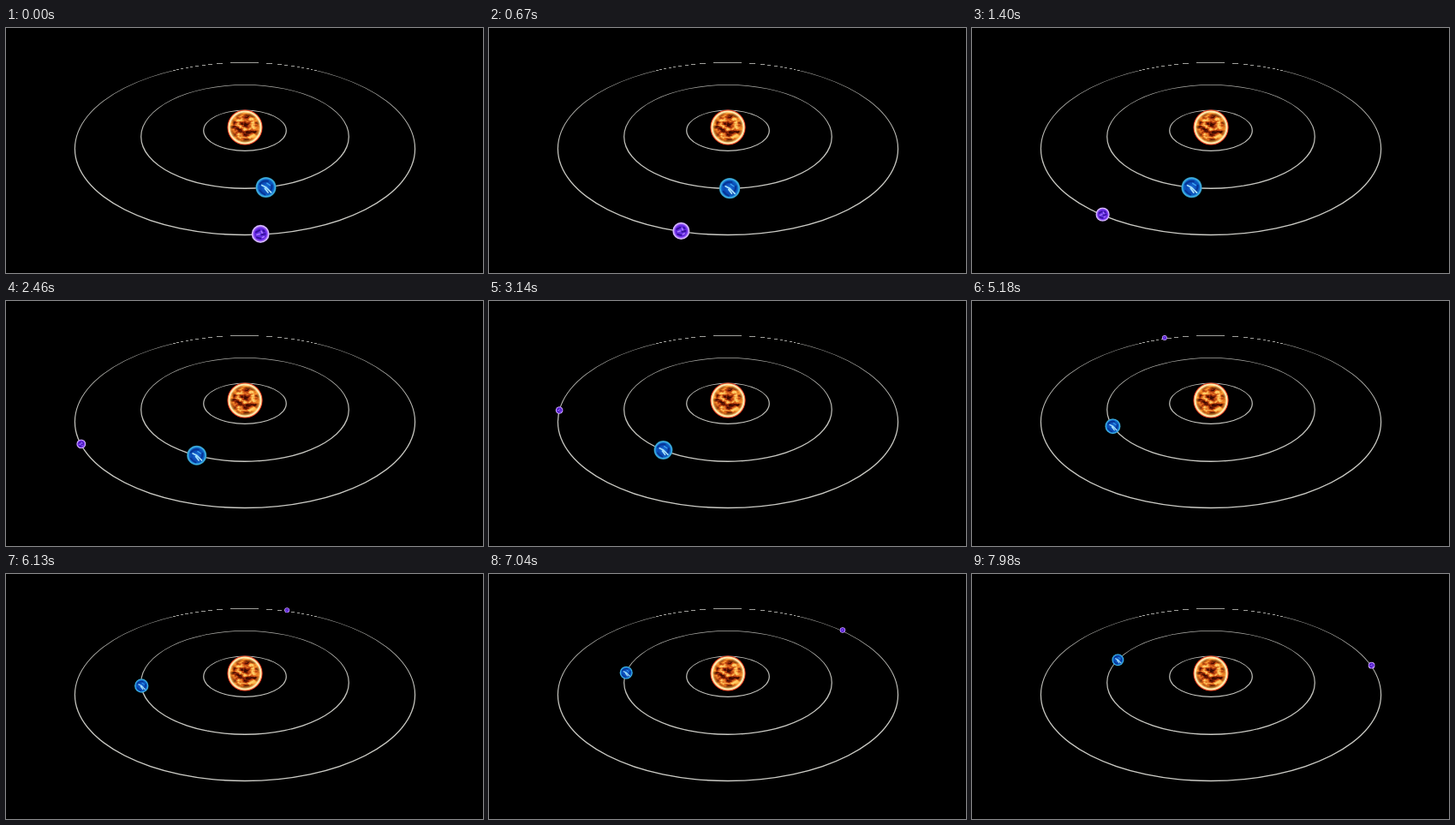
An HTML page that plays this animation: 557 by 286 pixels, repeating every 8 s.

```html
<!DOCTYPE html>
<html lang="en">
<head>
<meta charset="utf-8">
<title>Orbits</title>
<style>
  html, body { margin: 0; width: 100%; height: 100%; overflow: hidden; background: #000; }
  svg { display: block; width: 557px; height: 286px; }
  .orbit { fill: url(#fade); fill-rule: evenodd; }
</style>
</head>
<body>
<svg viewBox="0 0 557 286">
  <defs>
    <clipPath id="far"><rect width="557" height="50"/></clipPath>
    <clipPath id="near"><rect y="50" width="557" height="236"/></clipPath>
    <linearGradient id="fade" gradientUnits="userSpaceOnUse" x1="0" y1="40" x2="0" y2="242">
      <stop offset="0" stop-color="#a0a09c"/>
      <stop offset=".5" stop-color="#c4c4be"/>
      <stop offset="1" stop-color="#ccccc6"/>
    </linearGradient>
    <g id="orbits"></g>

    <filter id="plasma" x="0" y="0" width="1" height="1" color-interpolation-filters="sRGB">
      <feTurbulence type="fractalNoise" baseFrequency=".13 .2" numOctaves="3" seed="11"/>
      <feColorMatrix values="2.2 0 0 0 -.6  2.2 0 0 0 -.6  2.2 0 0 0 -.6  0 0 0 0 1"/>
      <feComponentTransfer>
        <feFuncR type="table" tableValues=".25 .52 .78 .92 1"/>
        <feFuncG type="table" tableValues=".04 .13 .3 .5 .8"/>
        <feFuncB type="table" tableValues="0 .03 .08 .16 .4"/>
      </feComponentTransfer>
      <feComposite in2="SourceGraphic" operator="in"/>
    </filter>
    <radialGradient id="sunRim">
      <stop offset=".64" stop-color="#f90" stop-opacity="0"/>
      <stop offset=".78" stop-color="#ffa83c" stop-opacity=".55"/>
      <stop offset=".86" stop-color="#ffe8a0" stop-opacity=".95"/>
      <stop offset=".91" stop-color="#fff2c0"/>
      <stop offset=".95" stop-color="#f0703c"/>
      <stop offset=".98" stop-color="#dc3420"/>
      <stop offset="1" stop-color="#a81c10" stop-opacity=".6"/>
    </radialGradient>
    <radialGradient id="blueBall">
      <stop offset="0" stop-color="#1a74dc"/>
      <stop offset=".5" stop-color="#0a48b4"/>
      <stop offset=".75" stop-color="#0c60c4"/>
      <stop offset=".9" stop-color="#40b4e8"/>
      <stop offset="1" stop-color="#2e88a8"/>
    </radialGradient>
    <radialGradient id="violetBall">
      <stop offset="0" stop-color="#7040ec"/>
      <stop offset=".6" stop-color="#5c20d8"/>
      <stop offset=".76" stop-color="#9050f8"/>
      <stop offset=".9" stop-color="#e0c8ff"/>
      <stop offset="1" stop-color="#a480dc"/>
    </radialGradient>
  </defs>

  <rect width="557" height="286"/>
  <g clip-path="url(#far)"><use href="#orbits" shape-rendering="crispEdges"/></g>
  <g clip-path="url(#near)"><use href="#orbits"/></g>

  <circle cx="279" cy="116" r="19.5" filter="url(#plasma)"/>
  <circle cx="279" cy="116" r="20.8" fill="url(#sunRim)"/>

  <!-- Planets are drawn with radius 10 and scaled by depth -->
  <g id="blue">
    <circle r="10" fill="url(#blueBall)"/>
    <g fill="none" stroke-linecap="round">
      <path d="M-6-3Q-3-7 2-6M2 5Q6 3 6-2M-6 3Q-4 6-1 7" stroke="#083494" stroke-width="1.6"/>
      <path d="M-4-2L0 0L5 5M-1 1L2 5" stroke="#a4e0fc" stroke-width="1.5"/>
      <path d="M1-4L4-2" stroke="#3ca4f0" stroke-width="1.2"/>
    </g>
  </g>
  <g id="violet">
    <circle r="10" fill="url(#violetBall)"/>
    <g fill="none" stroke-linecap="round">
      <path d="M-5-2L-1-4M1 1L5 0M-4 4L0 5M3-4L4-3" stroke="#34109c" stroke-width="1.8"/>
      <path d="M-4 1L-1 0M1-3L2-1M2 4L4 3" stroke="#b080ff" stroke-width="1.3"/>
    </g>
  </g>
</svg>

<script>
const LOOP = 8000;
const RAD = Math.PI / 180;
const $ = id => document.getElementById(id);

const ellipse = (cx, top, bottom, rx) => {
  const ry = (bottom - top) / 2;
  return `M${cx - rx} ${top + ry}a${rx} ${ry} 0 1 0 ${2 * rx} 0a${rx} ${ry} 0 1 0 ${-2 * rx} 0z`;
};

// A ring that thins out toward its far side
const orbit = (top, bottom, rx, farWidth, nearWidth) => {
  const side = (farWidth + nearWidth) / 2 + 0.25;
  const d = ellipse(279, top, bottom, rx) +
            ellipse(279, top + farWidth, bottom - nearWidth, rx - side);
  return `<path class="orbit" d="${d}"/>`;
};

$('orbits').innerHTML =
  orbit(40.1, 242.2, 199.2, 0.55, 1.4) +
  orbit(66.1, 187.9, 121.9, 0.65, 1.3) +
  orbit(95.6, 143.9, 48.9, 0.85, 1.15);

// Angles run clockwise from the nearest point of the orbit
const planets = [
  {
    el: $('blue'), cx: 279.2, cy: 126.8, rx: 121.2, ry: 60.4,
    angle: t => -11.6 + 0.016 * t,
    size: y => 1 / (0.0412 + 0.000345 * (187 - y))
  },
  {
    el: $('violet'), cx: 279.2, cy: 140, rx: 198.6, ry: 100.8,
    angle: t => {
      const mean = 0.0315 * (t - 166);
      return mean + 3.2 * (1 - Math.cos(mean * RAD));
    },
    size: y => 1 / (0.0476 + 0.0006 * (240 - y))
  }
];

function draw(now) {
  const t = now % LOOP;
  for (const p of planets) {
    const a = p.angle(t) * RAD;
    const x = p.cx - p.rx * Math.sin(a);
    const y = p.cy + p.ry * Math.cos(a);
    p.el.setAttribute('transform', `translate(${x} ${y}) scale(${p.size(y) / 20})`);
  }
  requestAnimationFrame(draw);
}
draw(0);
</script>
</body>
</html>
```
